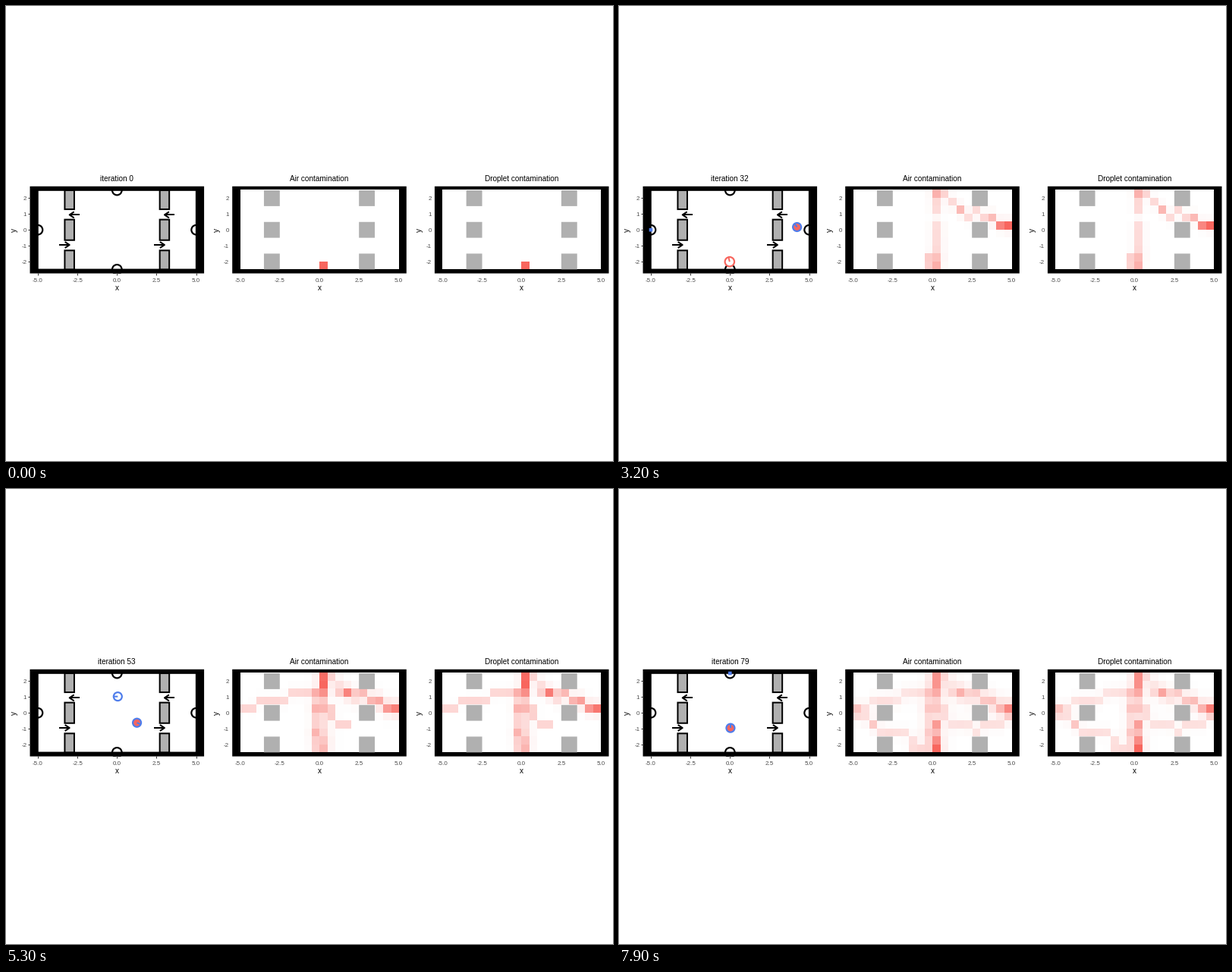
Write a matplotlib script that moves like this. It is 800 px wide and 600 px high and loops after 8000 ms.

```python
import numpy as np
import matplotlib.pyplot as plt
from matplotlib.animation import FuncAnimation
from matplotlib.colors import LinearSegmentedColormap
from matplotlib.patches import Circle, Rectangle

plt.rcParams["font.family"] = "Liberation Sans"
PX = 0.72              # points per pixel at 100 dpi
FRAMES = 80
UNIT, MID = 20.87, 295.2
CENTRES = (146.3, 413.0, 679.7)
RED, BLUE, GREY, DARK = "#F8665E", "#4F7DEB", "#B0B0B0", "#4D4D4D"

fig = plt.figure(figsize=(8, 6), dpi=100, facecolor="white")
ax = fig.add_axes([0, 0, 1, 1])
ax.axis("off")


def to_px(x, y, cx=CENTRES[0]):
    return cx + UNIT * x, MID - UNIT * y


def box(x, y, half_w, half_h, cx=CENTRES[0], **style):
    """Rectangle centred on (x, y) in room units."""
    corner = to_px(x - half_w, y + half_h, cx)
    return ax.add_patch(Rectangle(corner, 2 * half_w * UNIT, 2 * half_h * UNIT,
                                  snap=False, **{"lw": 0, **style}))


def line(xs, ys, color="black", width=2, z=8):
    return ax.plot(xs, ys, color=color, lw=width * PX, zorder=z,
                   solid_capstyle="butt")[0]


def label(x, y, text, size=10, color="black", **kw):
    kw = {"ha": "center", "va": "baseline", **kw}
    return ax.text(x, y, text, fontsize=size * PX, color=color, **kw)


def panel(cx, name):
    """Black frame, title and axis labels; returns title and frame."""
    for i in range(-2, 3):
        label(cx + 2.5 * UNIT * i, 364, f"{2.5 * i:.1f}", 8, DARK)
        label(cx - 119, MID - UNIT * i + 3, str(i), 8, DARK, ha="right")
    label(cx, 375, "x")
    label(cx - 135, MID, "y", rotation=90, va="center")
    frame = box(0, 0, 5.5, 2.75, cx, fc="black")
    return label(cx, 231, name), frame


def arrow(x, y, way):
    """Open-headed arrow whose tip is at (x, y) in room units."""
    px, py = to_px(x, y)
    line([px - 13.5 * way, px], [py, py])
    line([px - 6 * way, px, px - 6 * way], [py - 4, py, py + 4])


# Room plan
title, frame = panel(CENTRES[0], "iteration 0")
box(0, 0, 5, 2.5, fc="white", ec="black", lw=1.6 * PX, zorder=2)
for gate in (-3, 3):
    for y, half_h in ((1.9, 0.6), (0, 0.65), (-1.9, 0.6)):
        box(gate, y, 0.3, half_h, fc=GREY, ec="black", lw=2 * PX, zorder=3)
    arrow(gate, 0.95, -1)
    arrow(gate, -0.95, 1)
for spot in ((-5, 0), (5, 0), (0, 2.5), (0, -2.5)):
    ring = ax.add_patch(Circle(to_px(*spot), 6.3, fill=False, lw=2.2 * PX,
                               zorder=4))
    ring.set_clip_path(frame)
for i in range(-2, 3):
    line([CENTRES[0] + 2.5 * UNIT * i] * 2, [352, 355], "#333333", 1)
    line([29, 32], [MID - UNIT * i] * 2, "#333333", 1)

# Contamination maps
cmap = LinearSegmentedColormap.from_list("dose", ["white", RED])
maps = []
for cx, name in zip(CENTRES[1:], ("Air contamination", "Droplet contamination")):
    panel(cx, name)
    x0, y0 = to_px(-5, -2.5, cx)
    x1, y1 = to_px(5, 2.5, cx)
    maps.append(ax.imshow(np.zeros((10, 20)), extent=(x0, x1, y0, y1),
                          origin="lower", cmap=cmap, vmin=0, vmax=1,
                          interpolation="nearest", aspect="auto", zorder=3))
    for gate in (-3, 3):
        for y in (2, 0, -2):
            box(gate, y, 0.5, 0.5, cx, fc=GREY, zorder=4)
ax.set_xlim(0, 800)
ax.set_ylim(600, 0)


class Walker:
    """A person walking a route of points, speeding up slightly on the way."""

    def __init__(self, ring, fill, dose, start, end, *route):
        self.start, self.end, self.dose = start, end, dose
        self.route = np.array(route)
        steps = np.hypot(*np.diff(self.route, axis=0).T)
        self.length = np.concatenate([[0], np.cumsum(steps)])
        self.r = 5.5 if ring == BLUE else 6.2
        self.disc = ax.add_patch(Circle((0, 0), self.r, fc=fill, ec=ring,
                                        lw=2.2 * PX, zorder=6))
        self.nose = line([], [], ring, z=7)

    def present(self, t):
        return self.start <= t <= self.end

    def at(self, t):
        u = np.clip((t - self.start) / (self.end - self.start), 0, 1)
        s = self.length[-1] * u ** 1.2
        return np.array([np.interp(s, self.length, c) for c in self.route.T])

    def draw(self, t):
        seen = self.present(t)
        self.disc.set_visible(seen)
        self.nose.set_visible(seen)
        if seen:
            px, py = to_px(*self.at(t))
            a = min(t, self.end - 1)
            dx, dy = self.at(a + 1) - self.at(a)
            k = self.r / np.hypot(dx, dy)
            self.disc.center = px, py
            self.nose.set_data([px, px + k * dx], [py, py - k * dy])


# Doors, and the lanes leading from them through the gates
N, S, E, W = (0.03, 2.15), (0.03, -2.23), (4.8, 0.03), (-4.8, 0.03)
EAST_IN = E, (4.28, 0.11), (3.75, 0.85), (2.8, 1.05)
WEST_OUT = (-2, 1.02), (-3.6, 0.75), W
EAST_OUT = (2.3, -1.05), (3, -0.95), (4.3, -0.75), E
WEST_IN = W, (-4.3, -0.3), (-3.2, -1.05), (-2.3, -1.1)

walkers = [
    Walker(RED, RED, 1, 1, 10, S, N),
    Walker(BLUE, "white", 0, 6, 31, *EAST_IN, *WEST_OUT),
    Walker(RED, RED, 1, 10, 22, *EAST_IN, (2.2, 0.95), (0.3, 2.4)),
    Walker(RED, "white", 0.04, 13, 23, N, (0.9, -0.9), S),
    Walker(RED, "white", 1, 31, 43, S, (-0.1, -1.7), (-0.1, 0), N),
    Walker(BLUE, RED, 1, 30, 51, *EAST_IN, *WEST_OUT),
    Walker(BLUE, "white", 0, 40, 63, *EAST_IN, *WEST_OUT),
    Walker(BLUE, RED, 1, 45, 61, N, (0.25, 0.7), (1.2, -0.6), *EAST_OUT),
    Walker(BLUE, RED, 1, 56, 68, *WEST_IN, (-0.8, -2.2), S),
    Walker(BLUE, RED, 1, 74, 88, S, N),
]

# People waiting in doorways: colour, place, first and last iteration
dots = [(box(*spot, 0.11, 0.11, fc=color, zorder=5), start, end)
        for color, spot, start, end in (
            (BLUE, (-5, 0), 3, 50), (RED, (0, 2.5), 11, 22),
            (RED, (5, 0), 19, 29), (BLUE, (5, 0), 44, 48),
            (BLUE, (0, -2.5), 58, 66), (BLUE, (0, 2.5), 76, 79))]

# Obstacle cells take no part in the spreading
free = np.ones((10, 20))
for col in (3, 15):
    for row in (0, 4, 8):
        free[row:row + 2, col:col + 2] = 0


def spread(dose, rate):
    open_, old = np.pad(free, 1), np.pad(dose, 1)
    flow = 0
    for shift, axis in ((1, 0), (-1, 0), (1, 1), (-1, 1)):
        near = np.roll(old, shift, axis) - old
        flow = flow + near * np.roll(open_, shift, axis)
    return dose + rate * flow[1:-1, 1:-1] * free


def simulate(rate):
    """Dose maps per iteration, each scaled to its own maximum."""
    dose, history = np.zeros((10, 20)), []
    for k in range(1, FRAMES + 1):
        dose = spread(dose, rate)
        for w in walkers:
            if w.present(k):
                x, y = w.at(k)
                dose[int((y + 2.5) * 2), int((x + 5) * 2)] += w.dose
        history.append(dose / dose.max())
    return history


histories = [simulate(0.004), simulate(0.0025)]


def update(k):
    title.set_text(f"iteration {k}")
    for image, history in zip(maps, histories):
        image.set_data(history[k])
    for w in walkers:
        w.draw(k)
    for dot, start, end in dots:
        dot.set_visible(start <= k <= end)
    return []


anim = FuncAnimation(fig, update, frames=FRAMES, interval=100, repeat=True,
                     repeat_delay=0, init_func=lambda: update(0))
plt.show()
```
